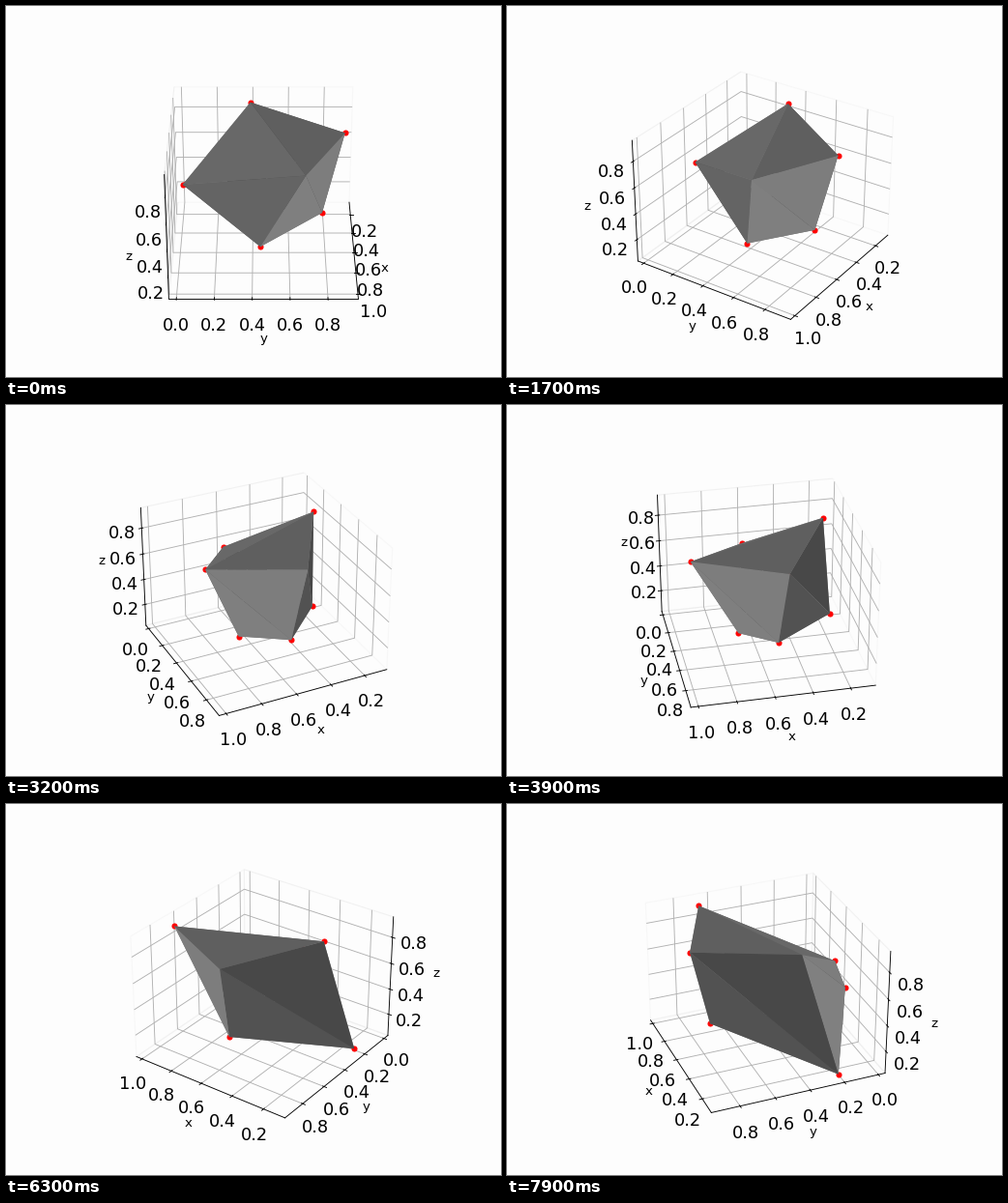
A matplotlib script for the animation above (8000 ms loop, 512 by 384 pixels).

```python
import matplotlib.pyplot as plt
import numpy as np
from matplotlib.animation import FuncAnimation

FRAMES = 80
STEP = 2  # degrees of azimuth per frame
BACKGROUND = "#fdfdfd"

# Corners of the solid, A to H
CORNERS = dict(
    A=(0.2244, 0.3878, 0.9364),
    B=(0.5146, 0.8964, 0.8954),
    C=(0.5922, 0.0236, 0.5586),
    D=(0.6926, 0.4424, 0.1502),
    E=(0.9772, 0.6755, 0.9037),
    F=(0.5457, 0.7813, 0.3047),
    G=(0.1288, 0.2080, 0.0481),
    H=(0.4387, 0.0312, 0.4560),
)
FACES = "CAE CED AEB EBF EFD ABG BFG DFG CDH DGH ACH AHG".split()

points = np.array(list(CORNERS.values()))
names = list(CORNERS)


def face_up(face):
    """Corner indices of a face, counter-clockwise as seen from above."""
    idx = [names.index(c) for c in face]
    u, v = points[idx[1:], :2] - points[idx[0], :2]
    return idx if u[0] * v[1] > u[1] * v[0] else idx[::-1]


fig = plt.figure(figsize=(6.4, 4.8), dpi=80, facecolor=BACKGROUND)
ax = fig.add_subplot(projection="3d", computed_zorder=False,
                     facecolor=BACKGROUND)

ax.scatter(*points.T, s=20, color="red", depthshade=False, zorder=1)
ax.plot_trisurf(*points.T, triangles=[face_up(f) for f in FACES],
                color="gray", zorder=2)

ax.set(xlim=(0.067, 1.039), ylim=(-0.040, 0.960), zlim=(0.0295, 0.955))
ax.set_xticks(np.arange(0.2, 1.01, 0.2))
ax.set_yticks(np.arange(0.0, 0.81, 0.2))
ax.set_zticks(np.arange(0.2, 0.81, 0.2))
ax.tick_params(labelsize=16)
for axis, name in zip((ax.xaxis, ax.yaxis, ax.zaxis), "xyz"):
    axis.set_major_formatter("{x:.1f}")
    axis.set_label_text(name, fontsize=12)
    axis.pane.fill = False


def update(i):
    ax.view_init(elev=30, azim=STEP * i)
    return []


anim = FuncAnimation(fig, update, frames=FRAMES, interval=100,
                     repeat=True, repeat_delay=0, blit=False)
plt.show()
```
